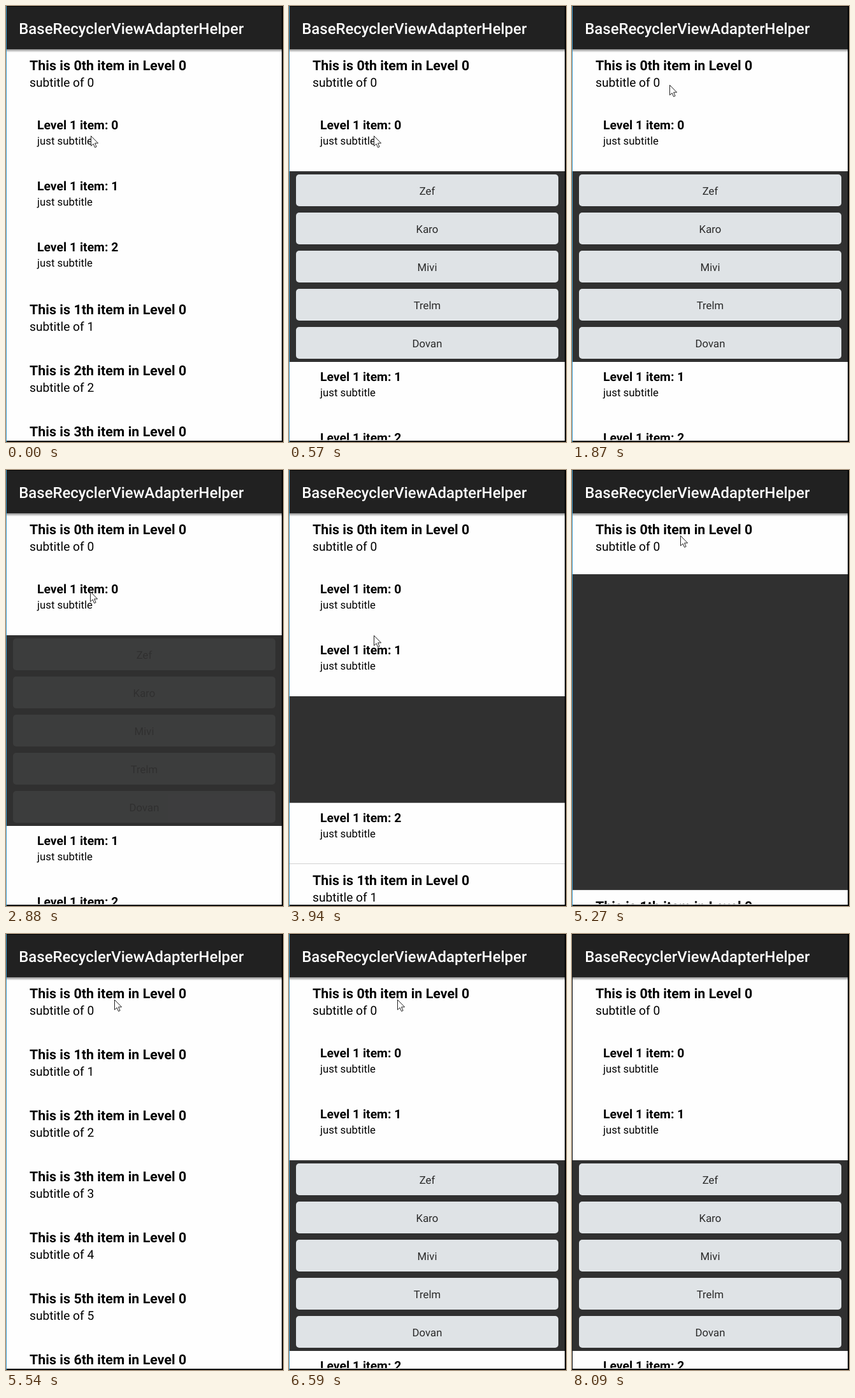
These frames come from a looping animation (435 px wide and 686 px high, 8190 ms). An HTML page:

```html
<!DOCTYPE html>
<html lang="en">
<head>
<meta charset="utf-8">
<title>Expandable list</title>
<style>
  html, body { margin: 0; width: 100%; height: 100%; overflow: hidden; background: #000; }
  svg { display: block; width: 435px; height: 686px; }
  text { font-family: Roboto, "Noto Sans", sans-serif; text-rendering: geometricPrecision; fill: #000; }
  .bar { font-size: 23.95px; font-weight: 500; fill: #fff; }
  .t0 { font-size: 21.45px; font-weight: 700; }
  .s0 { font-size: 19.2px; }
  .t1 { font-size: 19.4px; font-weight: 700; }
  .s1 { font-size: 16.8px; }
  .name { font-size: 16.8px; text-anchor: middle; fill: #2a2a2a; }
  .row { fill: #fefefe; }
  .card { fill: #dfe3e6; }
</style>
</head>
<body>
<svg viewBox="0 0 435 686">
  <defs>
    <clipPath id="view"><rect x="1" y="68" width="432" height="615"/></clipPath>
    <linearGradient id="shade" x2="0" y2="1">
      <stop offset="0" stop-opacity=".45"/>
      <stop offset="1" stop-opacity="0"/>
    </linearGradient>
  </defs>
  <rect width="435" height="686"/>
  <g clip-path="url(#view)">
    <rect x="1" y="68" width="432" height="615" fill="#303030"/>
    <g id="list"></g>
    <rect x="1" y="68" width="432" height="5" fill="url(#shade)"/>
  </g>
  <rect x="1" y="1" width="432" height="67" fill="#212121"/>
  <rect x="1" y="683" width="432" height="1" fill="#fefefe"/>
  <text class="bar" x="20.2" y="44">BaseRecyclerViewAdapterHelper</text>
  <rect id="edge" width="1" height="686"/>
  <path id="cursor" d="M.5 .5V16.2L4.1 12.9 6.6 18.6 9.1 17.5 6.6 11.9H11.6Z"
        fill="#fff" stroke="#222" stroke-width="1"/>
</svg>
<script>
const LOOP = 8190, STEP = 134.6, LEAD = 15; // the screen refreshes once per STEP ms
const ROW = 96, TOP = 68, CARD = 60;
const MOVE = 250, FADE = 120;
const NAMES = ['Zef', 'Karo', 'Mivi', 'Trelm', 'Dovan'];
const PANEL = NAMES.length * CARD;

// Pointer stops: [step, x, y]
const STOPS = [
  [0, 133, 204], [4, 133, 204], [8, 147, 203], [11, 147, 203], [14, 153, 124],
  [16, 134, 192], [17, 132, 191], [21, 132, 191], [24, 133, 287], [28, 133, 287],
  [29, 133, 260], [32, 152, 138], [35, 170, 103], [51, 170, 103], [53, 338, 361],
  [54, 268, 520], [55, 339, 628], [57, 360, 700], [60, 360, 700]
];

const $ = id => document.getElementById(id);

function add(parent, tag, attrs = {}, text = '') {
  const el = document.createElementNS('http://www.w3.org/2000/svg', tag);
  for (const key in attrs) el.setAttribute(key, attrs[key]);
  el.textContent = text;
  parent.append(el);
  return el;
}

function addRow(parent, level, title, subtitle, y = 0) {
  const g = add(parent, 'g', { transform: `translate(0 ${y})` });
  const x = level ? 49 : 37;
  add(g, 'rect', { class: 'row', x: 1, width: 432, height: ROW });
  add(g, 'text', { class: 't' + level, x, y: level ? 30 : 33 }, title);
  add(g, 'text', { class: 's' + level, x, y: level ? 54 : 59 }, subtitle);
  return g;
}

const addParent = (parent, i, y) =>
  addRow(parent, 0, `This is ${i}th item in Level 0`, `subtitle of ${i}`, y);

function addCards(y) {
  const g = add($('list'), 'g', { transform: `translate(0 ${y})` });
  NAMES.forEach((name, i) => {
    add(g, 'rect', { class: 'card', x: 11, y: i * CARD + 5, width: 412, height: 50, rx: 5 });
    add(g, 'text', { class: 'name', x: 217, y: i * CARD + 37 }, name);
  });
  return g;
}

addParent($('list'), 0, TOP);
const children = [0, 1, 2].map(i => addRow($('list'), 1, `Level 1 item: ${i}`, 'just subtitle'));
const cardsA = addCards(TOP + 2 * ROW);
const cardsB = addCards(TOP + 3 * ROW);
const rest = add($('list'), 'g');
for (let i = 1; i <= 6; i++) addParent(rest, i, (i - 1) * ROW);

const ramp = (t, start, length) => Math.min(1, Math.max(0, (t - start) / length));
const place = (el, x, y) => el.setAttribute('transform', `translate(${x} ${y})`);
const fade = (el, alpha) => el.setAttribute('opacity', alpha);

function pointerAt(step) {
  const i = STOPS.findIndex(stop => stop[0] >= step);
  const [end, x, y] = STOPS[i];
  const [begin, x0, y0] = STOPS[Math.max(0, i - 1)];
  const p = end > begin ? (step - begin) / (end - begin) : 1;
  return [x0 + (x - x0) * p, y0 + (y - y0) * p].map(Math.round);
}

function draw(time) {
  const step = Math.floor((time + LEAD) / STEP);
  const t = step * STEP;
  const moved = start => (1 - Math.cos(Math.PI * ramp(t, start, MOVE))) / 2;
  const faded = start => ramp(t, start, FADE);

  // Opening moves rows, then fades cards in; closing fades first, then moves.
  const gapA = PANEL * (moved(165) - moved(2835));
  const gapB = PANEL * moved(3769);
  const lift = (3 * ROW + PANEL) * (moved(5185) - moved(6050));
  const hidden = faded(5065) - faded(6470);
  const shifts = [0, gapA, gapA + gapB];

  children.forEach((row, i) => {
    place(row, 0, TOP + (i + 1) * ROW + shifts[i]);
    fade(row, 1 - hidden);
  });
  place(rest, 0, TOP + 4 * ROW + gapA + gapB - lift);
  fade(cardsA, faded(415) - faded(2715));
  fade(cardsB, faded(4019) - hidden);
  place($('cursor'), ...pointerAt(step));
  $('edge').setAttribute('fill', step < 60 ? '#3f9fd0' : '#10161c');
}

const start = performance.now();
function tick() {
  draw((performance.now() - start) % LOOP);
  requestAnimationFrame(tick);
}
tick();
</script>
</body>
</html>
```
